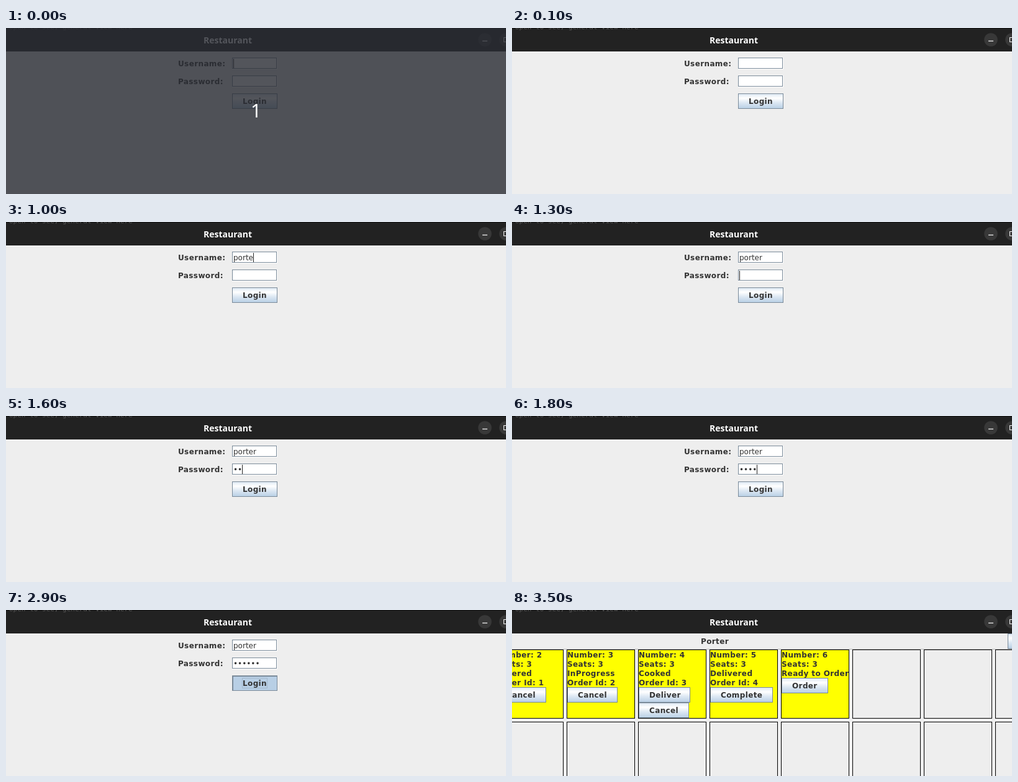
Recreate the animation shown at these times as an HTML page. Size 805x269 px, loop 3900 ms.

```html
<!DOCTYPE html>
<html lang="en">
<head>
<meta charset="utf-8">
<title>Restaurant login</title>
<style>
  html, body { margin: 0; width: 100%; height: 100%; overflow: hidden; background: #eee; }
  svg { display: block; }
  text { font: 12px "DejaVu Sans", sans-serif; fill: #333; white-space: pre; }
  .bold { font-weight: 700; letter-spacing: .38px; }
  .title { font: 700 14px "Noto Sans", sans-serif; fill: #fff; }
  .count { font: 30px "Noto Sans", sans-serif; fill: #fff; }
  .scrap { font: 11px "DejaVu Sans Mono", monospace; fill: #555; }
</style>
</head>
<body>
<svg id="stage" width="805" height="269" viewBox="0 0 805 269"></svg>
<script>
const LOOP = 3900;
const USER = "porter";
const STEEL = "#7a8a99", ICE = "#b8cfe5";

// Each step holds only what changes from then on.
const steps = [
  { at: 0, scene: "login", dim: true, user: 0, pass: 0, caret: "user", button: "idle" },
  { at: 100, dim: false, caret: "" },
  { at: 300, caret: "user" },
  ...[500, 600, 700, 800, 1000, 1100].map((at, i) => ({ at, user: i + 1 })),
  { at: 1300, caret: "pass" },
  ...[1500, 1600, 1700, 1800, 2000, 2100].map((at, i) => ({ at, pass: i + 1 })),
  { at: 2600, caret: "", button: "hover" },
  { at: 2900, button: "pressed" },
  { at: 3500, scene: "tables" }
];

const rect = (x, y, w, h, fill, extra = "") =>
  `<rect x="${x}" y="${y}" width="${w}" height="${h}" fill="${fill}" ${extra}/>`;
const frame = (x, y, w, h, stroke, fill = "none") =>
  rect(x + .5, y + .5, w - 1, h - 1, fill, `stroke="${stroke}"`);
const text = (x, y, content, cls = "bold", extra = "") =>
  `<text x="${x}" y="${y}" class="${cls}" ${extra}>${content}</text>`;
const group = (id, content) => `<g id="${id}">${content}</g>`;

const button = (x, y, w, label) =>
  frame(x, y, w, 25, STEEL, "url(#ocean)") + text(x + 17, y + 17, label);

const field = (id, y) =>
  rect(364, y, 73, 19, "#fff") + frame(364, y, 72, 18, STEEL) +
  text(366, y + 14, "", "", `id="${id}"`);

const hoverEdge = frame(364, 106, 73, 25, ICE) +
  frame(365, 107, 71, 23, STEEL) + frame(366, 108, 69, 21, ICE);

const pressedButton = rect(364, 106, 73, 25, STEEL) + rect(366, 108, 70, 22, ICE) +
  frame(380, 110, 41, 17, "#a3b8cc") + text(381, 123, "Login");

const login =
  text(277, 62, "Username:") + field("user", 48) +
  text(277, 91, "Password:") + field("pass", 77) +
  rect(366, 50, 1, 15, "#222", 'id="caret"') +
  button(364, 106, 73, "Login") +
  group("hover", hoverEdge) + group("pressed", pressedButton);

const CANCEL = ["Cancel", 81];
const tables = [
  { number: 2, lines: ["Ordered", "Order Id: 1"], actions: [CANCEL] },
  { number: 3, lines: ["InProgress", "Order Id: 2"], actions: [CANCEL] },
  { number: 4, lines: ["Cooked", "Order Id: 3"], actions: [["Deliver", 83], CANCEL] },
  { number: 5, lines: ["Delivered", "Order Id: 4"], actions: [["Complete", 101]] },
  { number: 6, lines: ["Ready to Order"], actions: [["Order", 75]] }
];

function cell(col, row) {
  const x = -27 + col * 115, y = 64 + row * 117;
  const table = row === 0 && tables[col];
  if (!table) return frame(x, y, 110, 112, "#000", "#eee");
  const lines = [`Number: ${table.number}`, "Seats: 3", ...table.lines];
  const top = y + 1 + lines.length * 15;
  return frame(x, y, 110, 112, "#000", "#ff0") +
    lines.map((line, i) => text(x + 1, y + 13 + i * 15, line)).join("") +
    table.actions.map(([label, w], i) => button(x + 1, top + i * 25, w, label)).join("");
}

const cells = Array.from({ length: 16 }, (_, i) => cell(i % 8, Math.floor(i / 8))).join("");
const overview = text(304, 55, "Porter") + button(798, 38, 80, "") +
  rect(0, 63, 805, 1, "#bbb") + cells;

const titleBar = rect(0, 0, 805, 38, "#222") + rect(0, 0, 805, 1, "#0c0c0c") +
  text(5, 1.5, "open to see, general view here", "scrap") +
  text(318, 25, "Restaurant", "title") +
  '<circle cx="771" cy="19" r="10.8" fill="#383838"/><circle cx="805" cy="19" r="10.8" fill="#383838"/>' +
  rect(767, 20.5, 8, 1.2, "#fff") + frame(801, 15, 8, 8, "#fff");

const curtain = rect(0, 0, 805, 269, "#282b33", 'opacity=".8"') +
  text(402.5, 145, "1", "count", 'text-anchor="middle"');

document.getElementById("stage").innerHTML =
  `<defs><linearGradient id="ocean" x2="0" y2="1">
    <stop offset="0" stop-color="#dde8f3"/><stop offset=".3" stop-color="#fff"/>
    <stop offset=".6" stop-color="#dde8f3"/><stop offset="1" stop-color="${ICE}"/>
  </linearGradient></defs>` +
  rect(0, 0, 805, 269, "#eee") + titleBar +
  group("login", login) + group("tables", overview) + group("dim", curtain);

const part = Object.fromEntries(
  [...document.querySelectorAll("#stage [id]")].map(el => [el.id, el]));
const show = (id, on) => { part[id].style.display = on ? "" : "none"; };

function render(time) {
  const state = Object.assign({}, ...steps.filter(step => step.at <= time));
  show("login", state.scene === "login");
  show("tables", state.scene === "tables");
  show("dim", state.dim);
  show("hover", state.button === "hover");
  show("pressed", state.button === "pressed");
  part.user.textContent = USER.slice(0, state.user);
  part.pass.textContent = "•".repeat(state.pass);
  show("caret", state.caret);
  if (state.caret) {
    const typed = part[state.caret];
    const width = typed.textContent ? typed.getComputedTextLength() : 0;
    part.caret.setAttribute("x", 366 + Math.round(width));
    part.caret.setAttribute("y", state.caret === "user" ? 50 : 79);
  }
}

const start = performance.now();
function tick() {
  render((performance.now() - start) % LOOP);
  requestAnimationFrame(tick);
}
tick();
</script>
</body>
</html>
```
